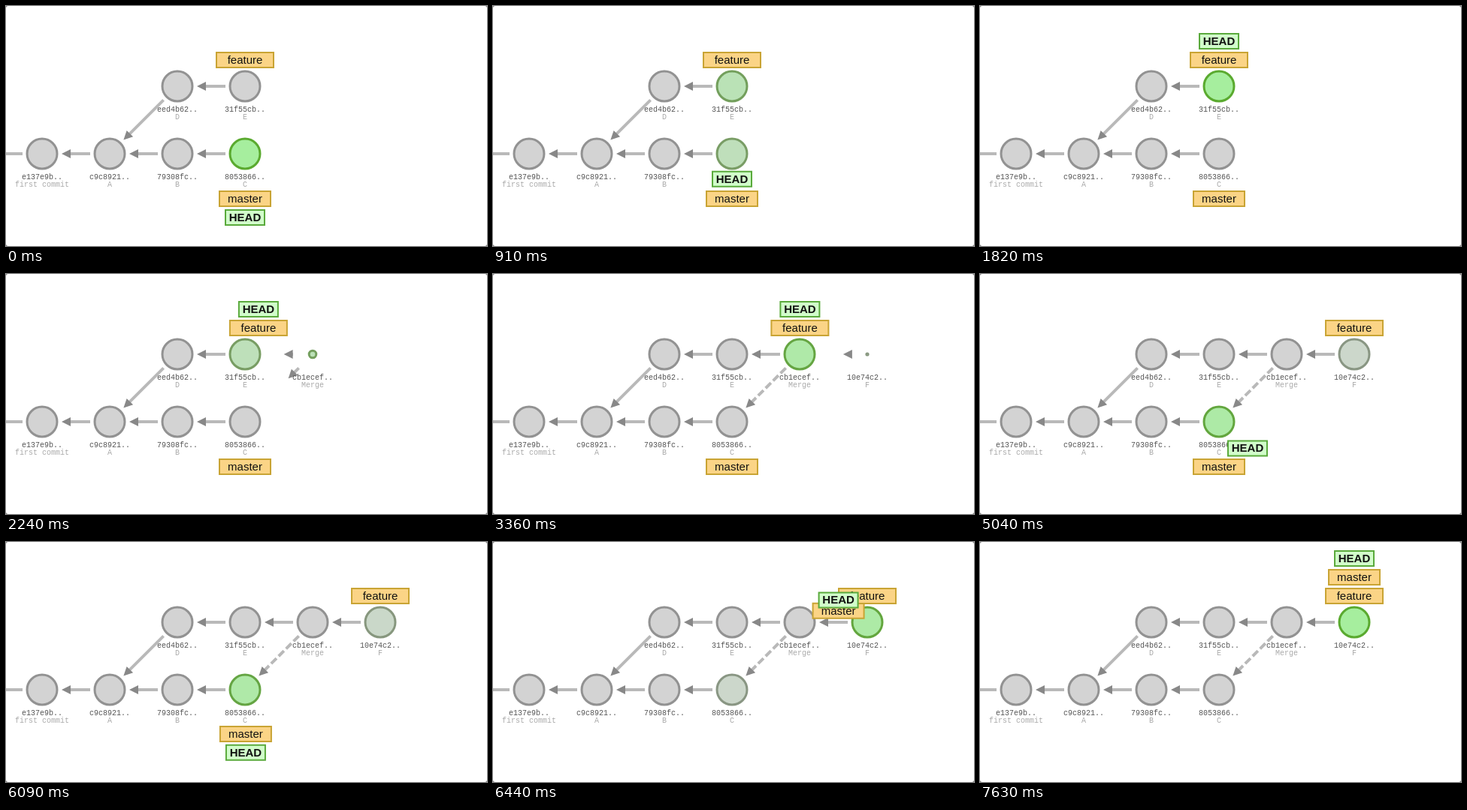
An HTML page with a canvas that plays this animation: 640 by 320 pixels, repeating every 7700 ms.

```html
<!DOCTYPE html>
<html lang="en">
<head>
<meta charset="utf-8">
<title>Commit graph</title>
<style>
  html, body { margin: 0; width: 100%; height: 100%; overflow: hidden; background: #fff; }
  canvas { display: block; width: 640px; height: 320px; }
</style>
</head>
<body>
<canvas id="stage" width="640" height="320"></canvas>
<script>
const ctx = document.getElementById('stage').getContext('2d');
const LOOP = 7700, STEP = 70;
const FADE = 750, LAG = 140, MOVE = 680;
const TOP = 107, BOTTOM = 197;

const GREY = { fill: [211, 211, 211], stroke: [146, 146, 146] };
const GREEN = { fill: [166, 238, 158], stroke: [90, 170, 47] };

const commits = {
  root:  { x: 48,  y: BOTTOM, id: 'e137e9b..', msg: 'first commit' },
  A:     { x: 138, y: BOTTOM, id: 'c9c8921..', msg: 'A', parents: ['root'] },
  B:     { x: 228, y: BOTTOM, id: '79308fc..', msg: 'B', parents: ['A'] },
  C:     { x: 318, y: BOTTOM, id: '8053866..', msg: 'C', parents: ['B'] },
  D:     { x: 228, y: TOP, id: 'eed4b62..', msg: 'D', parents: ['A'] },
  E:     { x: 318, y: TOP, id: '31f55cb..', msg: 'E', parents: ['D'] },
  Merge: { x: 408, y: TOP, id: 'cb1ecef..', msg: 'Merge', parents: ['E', 'C'], born: 1850 },
  F:     { x: 498, y: TOP, id: '10e74c2..', msg: 'F', parents: ['Merge'], born: 3150 }
};

// Each event moves the checked-out state and some tags.
const events = [
  { at: 512,  from: 'C', to: 'E', HEAD: [318, 47] },
  { at: 1850, from: 'E', to: 'Merge', HEAD: [408, 47], feature: [408, 72] },
  { at: 3150, from: 'Merge', to: 'F', HEAD: [498, 47], feature: [498, 72] },
  { at: 4475, from: 'F', to: 'C', HEAD: [318, 282] },
  { at: 5876, from: 'C', to: 'F', HEAD: [498, 22], master: [498, 47] }
];

const tags = [
  { name: 'master', home: [318, 257] },
  { name: 'feature', home: [318, 72] },
  { name: 'HEAD', home: [318, 282], bold: true }
];

const clamp = v => Math.max(0, Math.min(1, v));
const mix = (a, b, p) => a + (b - a) * p;
const mixAll = (a, b, p) => a.map((v, i) => mix(v, b[i], p));
const rgb = c => `rgb(${c.map(Math.round)})`;
const smooth = u => u * u * (3 - 2 * u);
const cubic = u => u < 0.5 ? 4 * u ** 3 : 1 - 4 * (1 - u) ** 3;
const fadeAt = (t, start) => smooth(clamp((t - start) / FADE));
const moveAt = (t, start) => cubic(clamp((t - start - LAG) / MOVE));

function greenness(key, t) {
  let g = key === 'C' ? 1 : 0;
  for (const e of events) {
    const p = fadeAt(t, e.at);
    if (e.to === key) g = mix(g, 1, p);
    if (e.from === key) g = mix(g, 0, p);
  }
  return g;
}

function tagPlace(tag, t) {
  return events.reduce(
    (pos, e) => e[tag.name] ? mixAll(pos, e[tag.name], moveAt(t, e.at)) : pos,
    tag.home);
}

function drawArrow(from, to, p, dashed) {
  const dx = to.x - from.x, dy = to.y - from.y;
  const reach = (Math.hypot(dx, dy) - 58) * p;
  ctx.save();
  ctx.translate(from.x, from.y);
  ctx.rotate(Math.atan2(dy, dx));
  ctx.translate(26, 0);
  ctx.strokeStyle = '#b9b9b9';
  ctx.lineWidth = 4;
  if (dashed) ctx.setLineDash([10, 4]);
  ctx.beginPath();
  ctx.moveTo(0, 0);
  ctx.lineTo(reach, 0);
  ctx.stroke();
  ctx.fillStyle = '#888';
  ctx.beginPath();
  ctx.moveTo(reach + 6, 0);
  ctx.lineTo(reach - 6, -6);
  ctx.lineTo(reach - 6, 6);
  ctx.fill();
  ctx.restore();
}

function drawCircle(key, t, p) {
  const { x, y } = commits[key], g = greenness(key, t);
  ctx.beginPath();
  ctx.arc(x, y, mix(1, 20, p), 0, Math.PI * 2);
  ctx.fillStyle = rgb(mixAll(GREY.fill, GREEN.fill, g));
  ctx.strokeStyle = rgb(mixAll(GREY.stroke, GREEN.stroke, g));
  ctx.lineWidth = 3;
  ctx.fill();
  ctx.stroke();
}

function drawLabel({ x, y, id, msg }) {
  ctx.font = '10px "Liberation Mono", "Courier New", monospace';
  ctx.fillStyle = '#555';
  ctx.fillText(id, x, y + 34);
  ctx.fillStyle = '#aaa';
  ctx.fillText(msg, x, y + 44);
}

function drawTag(tag, t) {
  const [x, y] = tagPlace(tag, t), w = tag.name.length * 8 + 20;
  ctx.fillStyle = tag.bold ? '#d1fdca' : '#fbd486';
  ctx.strokeStyle = tag.bold ? '#5aaa3c' : '#c9a434';
  ctx.lineWidth = 2;
  ctx.beginPath();
  ctx.rect(x - w / 2, y - 10, w, 20);
  ctx.fill();
  ctx.stroke();
  ctx.font = (tag.bold ? 'bold ' : '') + '15px "Liberation Sans", Arial, sans-serif';
  ctx.fillStyle = '#111';
  ctx.fillText(tag.name, x, y + 5);
}

function draw(t) {
  ctx.fillStyle = '#777';
  ctx.fillRect(0, 0, 640, 320);
  ctx.fillStyle = '#fff';
  ctx.beginPath();
  ctx.roundRect(0, 0, 640, 320, 3);
  ctx.fill();
  ctx.textAlign = 'center';

  const shown = Object.keys(commits).filter(k => t >= (commits[k].born || 0));
  const growth = c => c.born ? moveAt(t, c.born) : 1;

  drawArrow(commits.root, { x: -42, y: BOTTOM }, 1);
  for (const k of shown) {
    const c = commits[k];
    (c.parents || []).forEach((p, i) => drawArrow(c, commits[p], growth(c), i > 0));
  }
  for (const k of shown) drawCircle(k, t, growth(commits[k]));
  for (const k of shown) drawLabel(commits[k]);
  for (const tag of tags) drawTag(tag, t);
}

const began = performance.now();
function tick() {
  const t = (performance.now() - began) % LOOP;
  draw(Math.floor(t / STEP) * STEP);
  requestAnimationFrame(tick);
}
tick();
</script>
</body>
</html>
```
